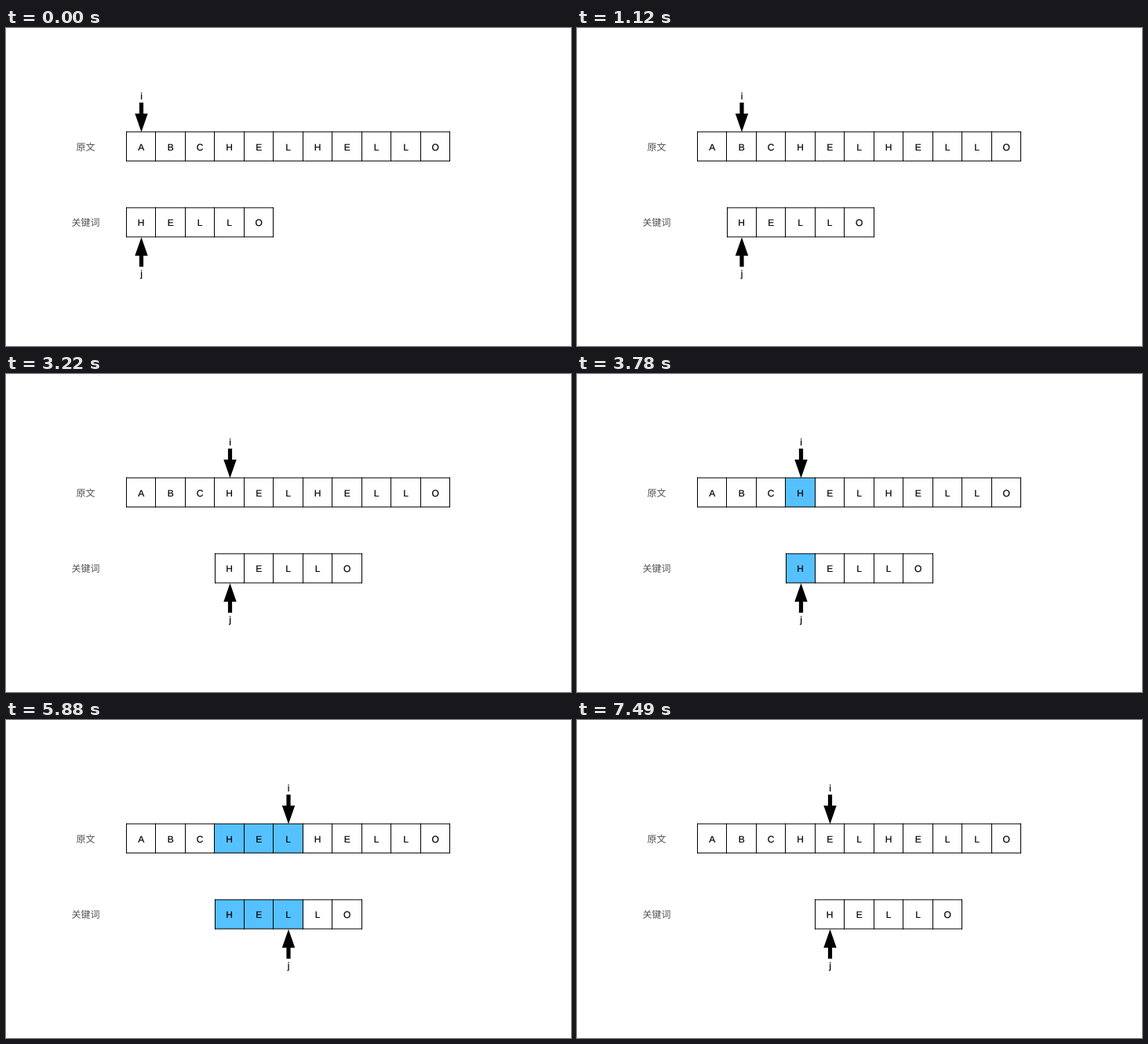
An HTML page that plays this animation: 720x405 px, repeating every 8000 ms.

```html
<!DOCTYPE html>
<html lang="zh-CN">
<head>
<meta charset="utf-8">
<title>字符串匹配</title>
<style>
  html, body { margin: 0; width: 100%; height: 100%; overflow: hidden; background: #fff; }
  svg { display: block; width: 100%; height: 100%; }
  text { text-anchor: middle; font: 12px "Liberation Sans", Arial, sans-serif; text-rendering: geometricPrecision; }
  .letter { stroke: #000; stroke-width: .2; }
  .label { font: 12px "Noto Sans CJK SC", "Noto Sans CJK", sans-serif; fill: #505050; }
</style>
</head>
<body>
<svg id="stage" viewBox="0 0 720 405"></svg>
<script>
const PITCH = 37.5, LEFT = 153.3, HEIGHT = 37.1, LOOP = 8000;
const TEXT = 'ABCHELHELLO', WORD = 'HELLO';
const MATCH = '#56c1ff', MISS = '#ff968d';

// start time, shift of the keyword, pointer cell, pointer x, matched cells, mismatch shown
const steps = [
  [0, 0, 0, 172.5, 0, false],
  [560, 0, 0, 172.5, 0, true],
  [1120, 1, 1, 210, 0, false],
  [1610, 1, 1, 210, 0, true],
  [2170, 2, 2, 248, 0, false],
  [2730, 2, 2, 248, 0, true],
  [3220, 3, 3, 285.5, 0, false],
  [3780, 3, 3, 285.5, 1, false],
  [4340, 3, 4, 323, 1, false],
  [4830, 3, 4, 323, 2, false],
  [5390, 3, 5, 360, 2, false],
  [5880, 3, 5, 360, 3, false],
  [6440, 3, 6, 397.5, 3, false],
  [7000, 3, 6, 397.5, 3, true],
  [7490, 4, 4, 322.5, 0, false]
];

const edge = k => Math.floor(LEFT + PITCH * k);
const rect = (x, y, w, h, fill = '#000') =>
  `<rect x="${x}" y="${y}" width="${w}" height="${h}" fill="${fill}"/>`;
const text = (x, y, s, cls) => `<text class="${cls}" x="${x}" y="${y}">${s}</text>`;

function row(letters, start, top, colorOf) {
  const first = Math.round(LEFT + PITCH * start), last = edge(start + letters.length);
  let fills = '', lines = '', labels = '';
  [...letters].forEach((ch, n) => {
    const k = start + n, x = n ? edge(k) : first, color = colorOf(k);
    if (color) fills += rect(x + .5, top + .5, edge(k + 1) - x, HEIGHT, color);
    lines += rect(x, top, 1, HEIGHT + 1);
    labels += text(172.2 + PITCH * k, top + 23.8, ch, 'letter');
  });
  lines += rect(last, top, 1, HEIGHT + 1);
  for (const y of [top, top + HEIGHT]) lines += rect(first, y, last - first + 1, 1);
  return fills + lines + labels;
}

// an arrow whose tip is at (x, y); dir -1 has its shaft above the tip
const arrow = (x, y, dir) =>
  `<path d="M${x} ${y}l8.2 ${23.5 * dir}h-5.6v${14 * dir}h-5.2v${-14 * dir}h-5.6z"/>`;

function scene([, shift, cell, x, matched, missed]) {
  const colorOf = k =>
    missed && k === cell ? MISS : k >= shift && k < shift + matched ? MATCH : '';
  return text(101.5, 156, '原文', 'label') + text(101.5, 252, '关键词', 'label') +
    row(TEXT, 0, 131.7, colorOf) + row(WORD, shift, 228.4, colorOf) +
    arrow(x, 132.4, -1) + arrow(x, 266.5, 1) +
    text(x, 91, 'i', 'letter') + text(x, 316.6, 'j', 'letter');
}

const stage = document.getElementById('stage');
const origin = performance.now();
let shown;

function tick() {
  const t = (performance.now() - origin) % LOOP;
  const step = steps.findLast(s => s[0] <= t);
  if (step !== shown) stage.innerHTML = scene(shown = step);
  requestAnimationFrame(tick);
}
tick();
</script>
</body>
</html>
```
